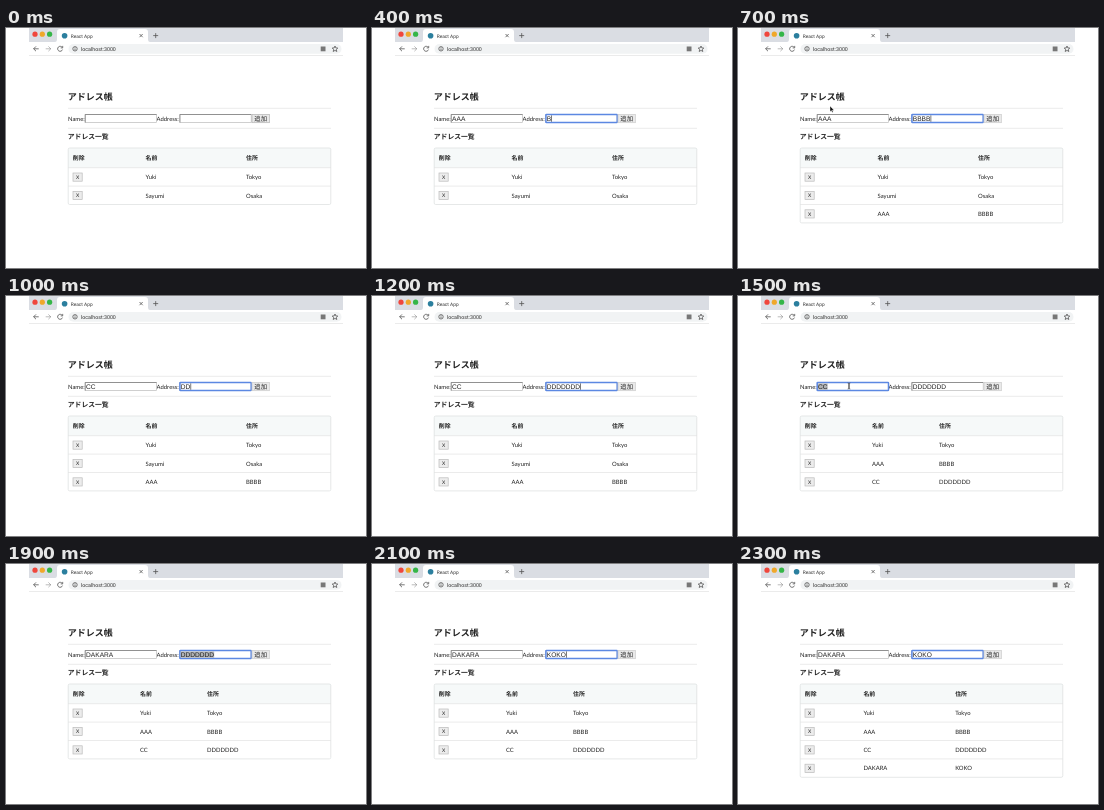
These frames come from a looping animation (360x240 px, 2400 ms). An HTML page:

```html
<!DOCTYPE html>
<html lang="ja">
<head>
<meta charset="utf-8">
<style>
html, body { margin: 0; width: 100%; height: 100%; overflow: hidden; background: #fff; }
svg { display: block; text-rendering: geometricPrecision; }
text { font: 5.9px Lato, "Noto Sans CJK JP", "Noto Sans CJK", sans-serif; fill: #222; }
.ui { font: 5.3px Roboto, sans-serif; fill: #333; }
.b { font-weight: bold; }
.field { font: 6.6px "Liberation Sans", Arial, sans-serif; }
.icon { fill: none; stroke: #555; stroke-width: .8; }
.line { stroke: #e2e3e3; stroke-width: .7; }
</style>
</head>
<body>
<svg width="360" height="240" viewBox="0 0 360 240">
  <path d="M23 14V0H337V14Z" fill="#dadde3"/>
  <path d="M49 14Q51 14 51 11V4Q51 1 54 1H139Q142 1 142 4V11Q142 14 144 14Z" fill="#fff"/>
  <circle cx="29" cy="6.2" r="2.6" fill="#f0463c"/>
  <circle cx="36.3" cy="6.2" r="2.6" fill="#f0a82a"/>
  <circle cx="43.6" cy="6.2" r="2.6" fill="#35b648"/>
  <circle cx="58.6" cy="7.7" r="2.8" fill="#2b7f9e"/>
  <text class="ui" x="64.7" y="9.5" style="font-size:4.8px">React App</text>
  <path class="icon" d="M133.5 6l3.2 3.2m0-3.2l-3.2 3.2M147.2 7.6h5m-2.5-2.5v5"/>
  <rect x="62.5" y="16" width="273" height="9.8" rx="4.9" fill="#f1f3f4"/>
  <path class="icon" d="M32.7 20.8h-5m2.3-2.4l-2.4 2.4 2.4 2.4M56.2 19.4a2.5 2.5 0 1 0 .3 2.2M56.7 17.9v2h-2"/>
  <path class="icon" d="M39.7 20.8h5m-2.3-2.4l2.4 2.4-2.4 2.4" opacity=".5"/>
  <circle class="icon" cx="69" cy="20.8" r="2.2"/>
  <path class="icon" d="M69 20.4v1.6m0-2.8v.6"/>
  <text class="ui" x="75" y="22.6">localhost:3000</text>
  <rect x="314.7" y="18.5" width="4.8" height="4.8" fill="#777"/>
  <path class="icon" d="M329 18l.8 1.9 2 .2-1.5 1.3.5 2.1-1.8-1.1-1.8 1.1.5-2.1-1.5-1.3 2-.2Z"/>
  <path class="line" d="M23 27.5H337M62 80.3H325M62 100.3H325"/>
  <text class="b" x="61.8" y="72.3" style="font-size:9px">アドレス帳</text>
  <text x="62" y="92.7">Name:</text>
  <text x="150.6" y="92.7">Address:</text>
  <text class="b" x="61.8" y="111.4" style="font-size:6.8px">アドレス一覧</text>
  <g id="form"></g>
  <g id="table"></g>
  <g id="mouse"></g>
</svg>
<script>
const $ = id => document.getElementById(id);
const STEP = 100, STEPS = 24, ROW = 18.4;

const rect = (x, y, w, h, fill, stroke = 'none', more = '') =>
  `<rect x="${x}" y="${y}" width="${w}" height="${h}" fill="${fill}" stroke="${stroke}" ${more}/>`;
const text = (x, y, s, cls = '', more = '') =>
  `<text x="${x}" y="${y}" class="${cls}" ${more}>${s}</text>`;

const yuki = ['Yuki', 'Tokyo'], sayumi = ['Sayumi', 'Osaka'];
const aaa = ['AAA', 'BBBB'], cc = ['CC', 'DDDDDDD'], last = ['DAKARA', 'KOKO'];

// What changes at each step; everything else carries over.
// mouse: [x, y] is an arrow, [x, y, 1] a text beam.
const changes = {
  0: { name: '', addr: '', focus: '', sel: false, caret: true, mouse: null,
       rows: [yuki, sayumi], cols: [139.6, 240] },
  1: { focus: 'name', mouse: [122, 138] },
  2: { name: 'A', mouse: [115, 90, 1] },
  3: { name: 'AAA', mouse: null },
  4: { focus: 'addr', addr: 'B' },
  5: { addr: 'BBB' },
  6: { addr: 'BBBB' },
  7: { rows: [yuki, sayumi, aaa], mouse: [92, 78] },
  8: { focus: 'name', sel: true, mouse: [98, 90, 1] },
  9: { name: 'CC', sel: false, mouse: null },
  10: { focus: 'addr', addr: 'DD' },
  11: { addr: 'DDDDD' },
  12: { addr: 'DDDDDDD' },
  13: { focus: '', rows: [yuki, sayumi, aaa, cc], cols: [128, 212.3], mouse: [76, 168] },
  14: { rows: [yuki, aaa, cc], cols: [134, 201], mouse: [73, 167] },
  15: { focus: 'name', sel: true, mouse: [111, 90, 1] },
  16: { name: 'D', sel: false, mouse: null },
  17: { name: 'DAK' },
  18: { name: 'DAKARA' },
  19: { focus: 'addr', sel: true },
  20: { addr: 'KO', sel: false },
  21: { addr: 'KOKO' },
  22: { rows: [yuki, aaa, cc, last], cols: [125.4, 217.2], caret: false }
};

function stateAt(step) {
  const s = {};
  for (let i = 0; i <= step; i++) Object.assign(s, changes[i]);
  return s;
}

const pen = document.createElement('canvas').getContext('2d');
pen.font = '66px "Liberation Sans", Arial, sans-serif';

function field(x, value, focused, s) {
  const w = pen.measureText(value).width / 10, left = x + .9;
  let out = rect(x, 86.5, 71.3, 8.1, '#fff', '#bbb', 'stroke-width=".7"');
  out += focused
    ? rect(x, 86.5, 71.3, 8.1, 'none', '#5c88e2', 'stroke-width="1.5" rx=".6"')
    : `<path d="M${x} 94.6V86.5H${x + 71.3}" fill="none" stroke="#777" stroke-width=".7"/>`;
  if (focused && s.sel) out += rect(left, 87.5, w, 6.2, '#b0b2b5');
  out += text(left, 92.9, value, 'field');
  if (focused && !s.sel && s.caret) out += rect(left + w + .2, 87.4, .6, 6.3, '#222');
  return out;
}

function form(s) {
  return field(79.2, s.name, s.focus == 'name', s) +
    field(173.9, s.addr, s.focus == 'addr', s) +
    rect(246, 86.5, 17.4, 8.2, '#e9e9e9', s.focus ? '#ccc' : '#b4b4b4', 'stroke-width=".7"') +
    text(248.3, 92.7, '追加', '', 'style="font-size:6.4px"');
}

function table({ rows, cols }) {
  const h = 19.7 + rows.length * ROW;
  let out = rect(62.2, 120, 262.6, 19.7, '#f6f9f9') +
    rect(62.2, 120, 262.6, h, 'none', '#dcdede', 'stroke-width=".7" rx="1.5"');
  ['削除', '名前', '住所'].forEach((s, i) => out += text([66.8, ...cols][i], 131.9, s, 'b'));
  rows.forEach((row, i) => {
    const y = 139.7 + i * ROW;
    out += `<path class="line" d="M62 ${y}H325"/>` +
      rect(67, y + 5.3, 9.2, 8.2, '#ececec', '#bcbcbc', 'stroke-width=".7"') +
      text(71.6, y + 11.2, 'X', '', 'text-anchor="middle" style="font-size:5px"') +
      row.map((s, j) => text(cols[j], y + 11.4, s)).join('');
  });
  return out;
}

function mouse(m) {
  if (!m) return '';
  const [x, y, beam] = m;
  return `<g transform="translate(${x} ${y})">` + (beam
    ? '<path d="M-1.3-3q1.3 0 1.3 1V2q0 1-1.3 1M1.3-3Q0-3 0-2V2q0 1 1.3 1" fill="none" stroke="#333" stroke-width=".7"/>'
    : '<path d="M0 0V5.8L1.3 4.6 2.2 6.6 3.2 6.1 2.3 4.2H4.1Z" fill="#111" stroke="#fff" stroke-width=".4"/>') + '</g>';
}

let shown = -1;
function draw(now) {
  const step = Math.floor(now / STEP) % STEPS;
  if (step != shown) {
    shown = step;
    const s = stateAt(step);
    $('form').innerHTML = form(s);
    $('table').innerHTML = table(s);
    $('mouse').innerHTML = mouse(s.mouse);
  }
  requestAnimationFrame(() => draw(performance.now()));
}
draw(0);
</script>
</body>
</html>
```
